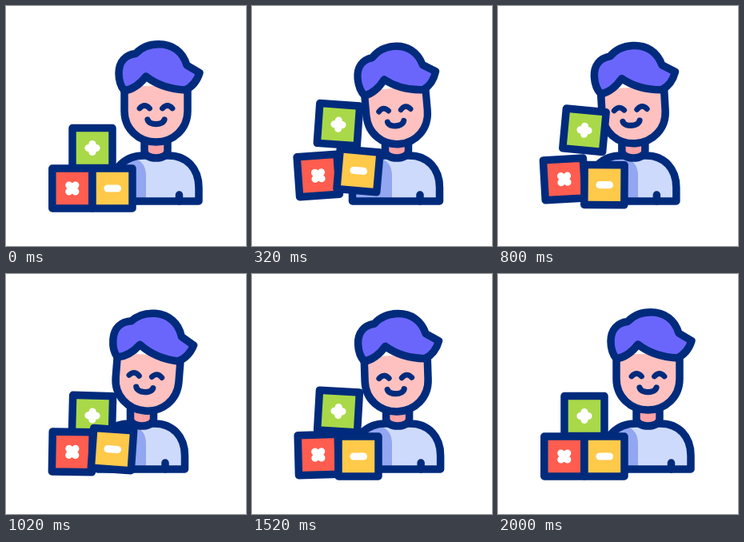
Write an HTML page with a canvas that moves like this. It is 300x300 px and loops after 3.6 s.

```html
<!DOCTYPE html>
<html>
<head>
<meta charset="utf-8">
<style>
html, body { margin: 0; width: 100%; height: 100%; overflow: hidden; background: #fff; }
canvas { display: block; width: 300px; height: 300px; }
</style>
</head>
<body>
<canvas id="stage"></canvas>
<script>
const LOOP = 3600, STEP = 20;
const NAVY = '#002b7c', SKIN = '#ffc1bf', NECK = '#ffa3a6', HAIR = '#6b66fb',
      SHIRT = '#cedafc', SHADE = '#92a6f1';

const canvas = document.getElementById('stage');
const ratio = window.devicePixelRatio || 1;
canvas.width = canvas.height = 300 * ratio;
const ctx = canvas.getContext('2d');

// Smooth curve through [time, value] keys, flat at both ends.
function track(...keys) {
  const slope = i => i === 0 || i === keys.length - 1 ? 0
    : (keys[i + 1][1] - keys[i - 1][1]) / (keys[i + 1][0] - keys[i - 1][0]);
  return t => {
    const last = keys.length - 1;
    if (t >= keys[last][0]) return keys[last][1];
    let i = 0;
    while (t >= keys[i + 1][0]) i++;
    const [t0, a] = keys[i], [t1, b] = keys[i + 1];
    const d = t1 - t0, u = (t - t0) / d, u2 = u * u, u3 = u2 * u;
    return a * (2 * u3 - 3 * u2 + 1) + b * (3 * u2 - 2 * u3)
      + d * (slope(i) * (u3 - 2 * u2 + u) + slope(i + 1) * (u3 - u2));
  };
}

const BEATS = [0, 320, 560, 1020, 1340, 1700, 2000];
const poses = (...values) => track(...BEATS.map((t, i) => [t, values[i]]));

// Height above the floor for a series of [start, end, peak] hops.
const hops = (...list) => t => {
  const hop = list.find(([a, b]) => t >= a && t < b);
  return hop ? hop[2] * Math.sin(Math.PI * (t - hop[0]) / (hop[1] - hop[0])) : 0;
};

const bodyX = poses(0, -6.5, -16, -17.5, -10, -1.5, 0);
const head = {
  x: poses(0, -3, -15, -14, -10, -1.5, 0),
  y: poses(0, 2.5, 3, 1, 3.5, 0, 0),
  tilt: poses(0, -5, -12, 4.5, -2, -0.8, 0),
  width: poses(1, 0.97, 1, 1, 1, 1, 1),
  faceX: poses(0, -2.5, -4.5, -2.5, -1.5, -1, 0),
  faceY: poses(0, -0.5, 0.5, -1, 0, 0, 0)
};

const blocks = [
  { x: 108, y: 177.5, color: '#a9d948', sign: 'M108 172.5V182.5M103 177.5H113',
    lift: hops([20, 1010, 36], [1010, 1650, 10]),
    turn: poses(0, 4, 9.5, 1.5, 6, 0, 0) },
  { x: 82.8, y: 228, color: '#ff5d4f', sign: 'M78.8 224L86.8 232M86.8 224L78.8 232',
    lift: hops([100, 950, 22], [950, 1400, 12], [1400, 1640, 2]),
    turn: poses(0, -4, -8, 1, -2.5, 0, 0) },
  { x: 133, y: 228, color: '#ffc94a', sign: 'M127 228H139.5',
    lift: hops([0, 850, 24], [850, 1220, 9], [1220, 1500, 4]),
    turn: track([0, 0], [320, 5], [560, 5], [850, 0], [1020, 4], [1220, 0], [1340, 2], [1500, 0]) }
];

const shapes = {
  body: new Path2D('M132 244V227C132 203 149 187 172 187H203C226 187 241 203 241 227V244Z'),
  neck: new Path2D('M173 165V181C173 193 202 193 202 181V165'),
  arm: new Path2D('M216.5 236V244'),
  shade: new Path2D('M120 190H160Q175 195 175 212V250H120Z'),
  face: new Path2D('M148 100V131C148 154 166 170 187.5 170C209 170 227 154 227 131V100'),
  hair: new Path2D('M148 106C143 100 141 92 141 84C141 70 149 61 162 59.5' +
    'C170 51 180 47.7 191 47.7C208 47.7 221 57 226 74L242 83.5' +
    'C239 93 233 101 224 105C205 104 189 99 175 88C168 97 160 104 148 106Z'),
  eyes: new Path2D('M167 128Q173.2 121 179.5 128M195.5 128Q201.8 121 208 128'),
  mouth: new Path2D('M177 142C179 149.5 196 149.5 198 142')
};
blocks.forEach(b => {
  b.sign = new Path2D(b.sign);
  b.box = new Path2D(`M${b.x - 25} ${b.y - 25}h50v50h-50z`);
});

function paint(path, fill, width, stroke = NAVY) {
  if (fill) {
    ctx.fillStyle = fill;
    ctx.fill(path);
  }
  if (width) {
    ctx.lineWidth = width;
    ctx.strokeStyle = stroke;
    ctx.stroke(path);
  }
}

// Draw with an offset, and a turn in degrees around (cx, cy).
function at(dx, dy, turn, cx, cy, draw, sx = 1) {
  ctx.save();
  ctx.translate(cx + dx, cy + dy);
  ctx.rotate(turn * Math.PI / 180);
  ctx.scale(sx, 1);
  ctx.translate(-cx, -cy);
  draw();
  ctx.restore();
}

function drawBody(t) {
  const dx = bodyX(t);
  at(dx, 0, 0, 0, 0, () => {
    paint(shapes.body, SHIRT);
    // The blocks' shade stays put while the body moves under it.
    ctx.save();
    ctx.clip(shapes.body);
    ctx.translate(-dx, 0);
    paint(shapes.shade, SHADE);
    ctx.restore();
    paint(shapes.body, null, 9.5);
    paint(shapes.arm, null, 9.5);
    paint(shapes.neck, NECK, 9.5);
  });
}

function drawHead(t) {
  at(head.x(t), head.y(t), head.tilt(t), 187.5, 170, () => {
    paint(shapes.face, SKIN, 9.5);
    at(head.faceX(t), head.faceY(t), 0, 0, 0, () => {
      paint(shapes.eyes, null, 6.8);
      paint(shapes.mouth, null, 7.2);
    });
    paint(shapes.hair, HAIR, 9.5);
  }, head.width(t));
}

function drawBlock(b, t) {
  at(0, -b.lift(t), b.turn(t), b.x, b.y, () => {
    paint(b.box, b.color, 9.5);
    paint(b.sign, null, 9.2, '#fff');
  });
}

function render(t) {
  ctx.setTransform(ratio, 0, 0, ratio, 0, 0);
  ctx.fillStyle = '#fff';
  ctx.fillRect(0, 0, 300, 300);
  ctx.lineCap = ctx.lineJoin = 'round';
  drawBody(t);
  drawHead(t);
  blocks.forEach(b => drawBlock(b, t));
}

const start = performance.now();
function tick() {
  const t = (performance.now() - start) % LOOP;
  render(Math.floor(t / STEP) * STEP);
  requestAnimationFrame(tick);
}
tick();
</script>
</body>
</html>
```
